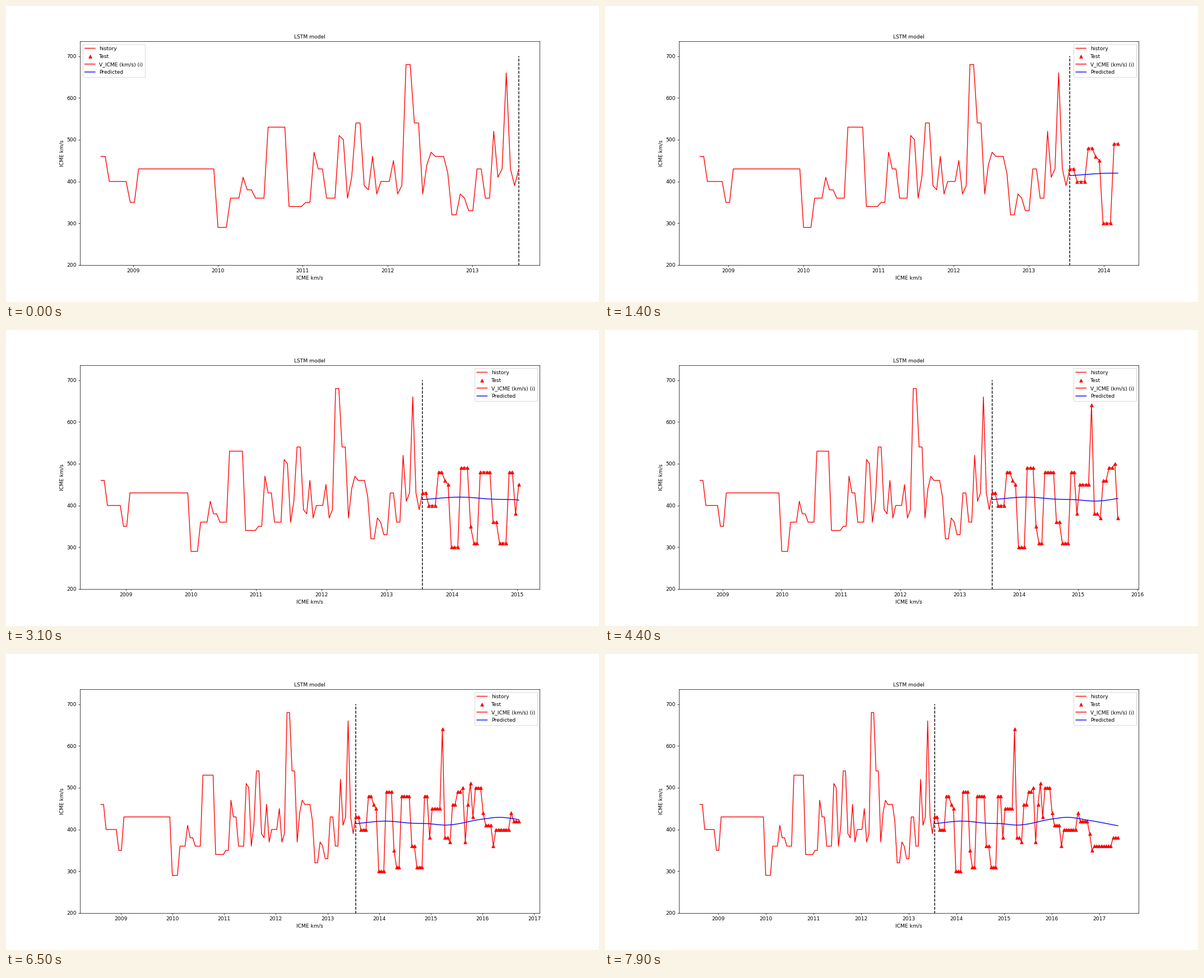
Animation of 1058x529 px, one loop 8 s. Source, as a matplotlib script:

```python
import numpy as np
import matplotlib.pyplot as plt
from matplotlib.animation import FuncAnimation

W, H = 1058, 529
DPI = W / 16
FRAMES, INTERVAL = 80, 100
STEP = 18                               # days between samples
START = np.datetime64("2008-08-15")
LEGEND_SWITCH = 10                      # samples shown when the legend moves


def levels(*items):
    """Flat series of speeds; a (speed, n) pair holds a speed for n samples."""
    series = []
    for item in items:
        speed, n = item if isinstance(item, tuple) else (item, 1)
        series += [speed] * n
    return np.array(series, float)


def smooth(x, knots):
    """Cubic Hermite curve through a few key points."""
    kx, ky = np.array(knots, float).T
    slope = np.gradient(ky, kx)
    i = np.clip(np.searchsorted(kx, x, "right") - 1, 0, len(kx) - 2)
    h = kx[i + 1] - kx[i]
    t = (x - kx[i]) / h
    ease = t * t * (3 - 2 * t)
    return (ky[i] + (ky[i + 1] - ky[i]) * ease
            + h * t * (1 - t) * (slope[i] * (1 - t) - slope[i + 1] * t))


history = levels(
    (460, 2), (400, 5), (350, 2), (430, 19), (290, 3), (360, 3), 410,
    (380, 2), (360, 3), (530, 5), (340, 4), (350, 2), 470, (430, 2),
    (360, 3), 510, 500, 360, 410, (540, 2), 390, 380, 460, 370, (400, 3),
    450, 370, 390, (680, 2), (540, 2), 370, 440, 470, (460, 3), 420,
    (320, 2), 370, 360, (330, 2), (430, 2), (360, 2), 520, 410, 430, 660,
    430, 390, 430)
test = levels(
    (430, 2), (400, 3), (480, 2), 460, 450, (300, 3), (490, 3), 350,
    (310, 2), (480, 4), (360, 2), (310, 3), (480, 2), 380, (450, 4), 640,
    (380, 2), 370, (460, 2), (490, 2), 500, 370, 460, 510, 430, (500, 3),
    440, (410, 3), 360, (400, 6), 440, (420, 4), 390, 350, (360, 8),
    (380, 3))
predicted = smooth(np.arange(len(test)), [
    (0, 414), (12, 420), (22, 415), (28, 414), (35, 410.5), (50, 425),
    (56, 429), (66, 421.5), (78, 409)])

hist_x = np.arange(len(history)) * STEP
split = hist_x[-1]
test_x = split + np.arange(len(test)) * STEP
years = np.arange(2009, 2019)
year_x = np.array([(np.datetime64(f"{y}-01-01") - START).astype(int)
                   for y in years])

plt.rcParams.update({"font.family": "DejaVu Sans", "font.size": 10})
fig = plt.figure(figsize=(16, H / DPI), dpi=DPI, facecolor="white")
fig.subplots_adjust(left=0.125, right=0.9, bottom=0.125, top=0.88)
ax = fig.add_subplot()
ax.set_title("LSTM model", fontsize=10)
ax.set_xlabel("ICME km/s")
ax.set_ylabel("ICME km/s")

ax.vlines(split, 0, 700, colors="k", linestyles="dashed", snap=False)
ax.plot(hist_x, history, "r-", label="history")
marks = ax.scatter([], [], s=36, c="r", marker="^", linewidths=1, zorder=2,
                   label="Test")
test_line, = ax.plot([], [], "r-", label="V_ICME (km/s) (i)")
pred_line, = ax.plot([], [], "b-", label="Predicted")
ax.set_ylim(200, 735)
legend = ax.legend(loc="upper left", scatterpoints=1, labelspacing=0.56)
for handle in legend.get_lines():
    handle.set_snap(False)


def draw(n):
    marks.set_offsets(np.column_stack([test_x[:n], test[:n]]))
    test_line.set_data(test_x[:n], test[:n])
    pred_line.set_data(test_x[:n], predicted[:n])

    end = split + STEP * max(n - 1, 0)
    lo, hi = -0.05 * end, 1.05 * end
    shown = (year_x >= lo) & (year_x <= hi)
    ax.set_xticks(year_x[shown], [str(y) for y in years[shown]])
    ax.set_xlim(lo, hi)
    legend.set_loc("upper left" if n < LEGEND_SWITCH else "upper right")
    return marks, test_line, pred_line


def reset():
    return draw(0)


anim = FuncAnimation(fig, draw, frames=FRAMES, init_func=reset,
                     interval=INTERVAL, repeat=True, repeat_delay=0)
plt.show()
```
